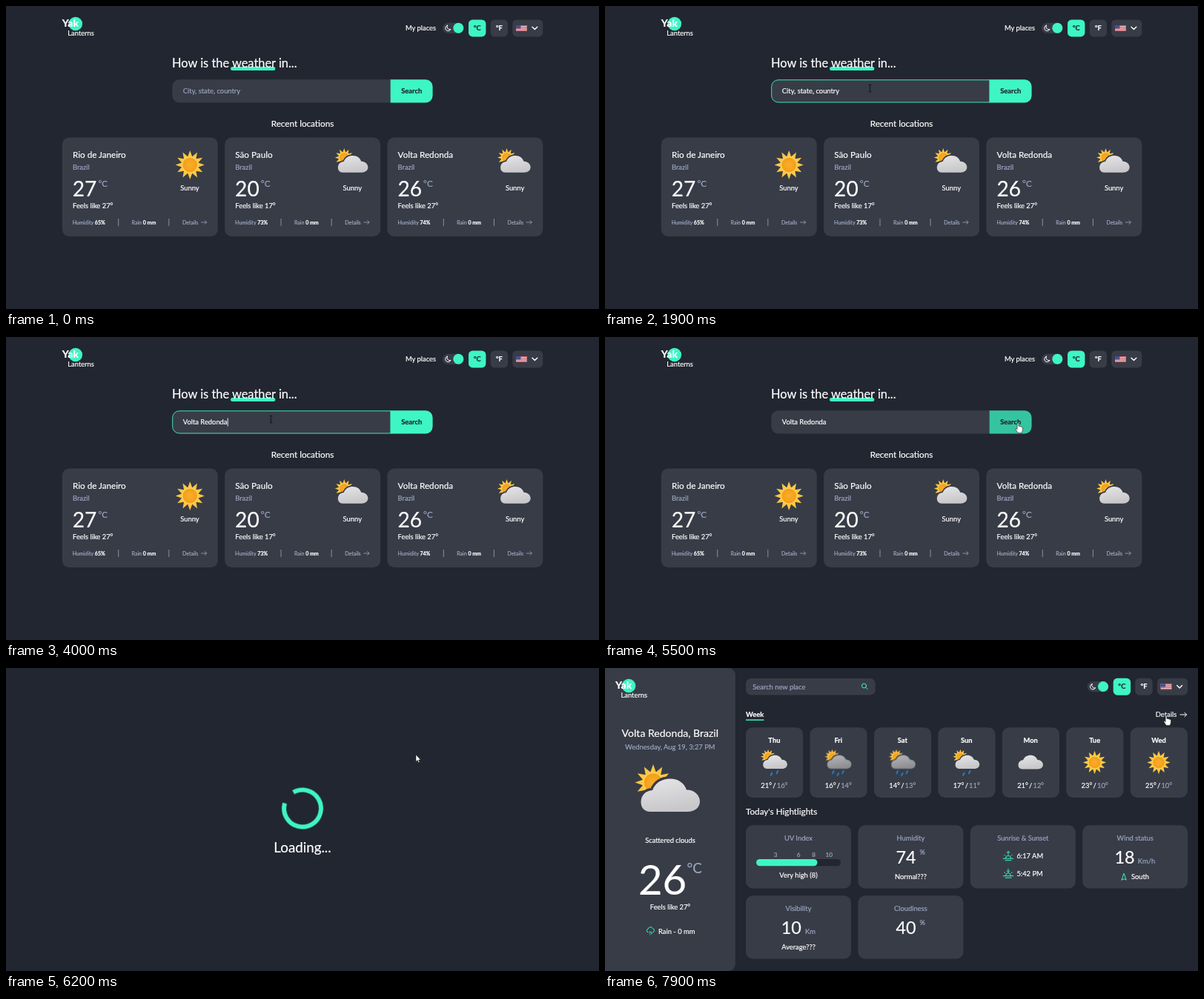
An HTML page for the animation above (8 s loop, 800 by 409 pixels).

```html
<!DOCTYPE html>
<html lang="en">
<head>
<meta charset="utf-8">
<title>Weather search</title>
<style>
:root { --bg: #222630; --card: #383c47; --mint: #3ef5c4; --muted: #9aa5be; }
html, body { margin: 0; width: 100%; height: 100%; overflow: hidden; background: var(--bg); }
svg { display: block; width: 100%; height: 100%; color: #fff; font-family: Lato, "Open Sans", sans-serif; }
text { font-size: 9.37px; }
text, tspan { fill: currentColor; stroke: currentColor; stroke-width: .2px; }
.b { font-weight: 700; }
.w { color: #fff; }
.g { color: var(--muted); }
.d { color: var(--bg); fill: var(--bg); }
.c { text-anchor: middle; }
.tight { word-spacing: -1.2px; }
.card { fill: var(--card); }
.mint { fill: var(--mint); }
.line { fill: none; stroke: var(--mint); stroke-width: 1; stroke-linecap: round; stroke-linejoin: round; }
.pen { fill: none; stroke: #fff; stroke-width: 1; stroke-linecap: round; stroke-linejoin: round; }

/* one 8 s loop; hard changes use step-end */
#home, #load, #dash, .arrow, .beam, .hand, .late { animation: 8s step-end infinite; }
#home { animation-name: home; }
#load { animation-name: load; }
#dash { animation-name: dash; }
.arrow { animation-name: arrow; }
.beam { animation-name: beam; }
.hand { animation-name: hand; }
.late { animation-name: late; }
.drop { animation: drop 8s step-end infinite; }
.slow { animation-delay: .1s; }
#cursor { animation: move 8s ease-in-out infinite; }
#ring { transform-origin: 400px 189.5px; animation: spin 1s linear infinite; }
#focus { animation: focus 8s linear infinite; }
#query { animation: query 8s linear infinite; }
#button { animation: button 8s linear infinite; }
#more text { animation: moreText 8s linear infinite; }
#more path { animation: moreLine 8s linear infinite; }

@keyframes home { 0% { opacity: 1 } 70.625%, 100% { opacity: 0 } }
@keyframes load { 0% { opacity: 0 } 70.625% { opacity: 1 } 78.125%, 100% { opacity: 0 } }
@keyframes dash { 0% { opacity: 0 } 78.125%, 100% { opacity: 1 } }
@keyframes arrow { 0% { opacity: 0 } 6.25% { opacity: 1 } 11.875% { opacity: 0 } 70.625% { opacity: 1 } 91.875%, 100% { opacity: 0 } }
@keyframes beam { 0% { opacity: 0 } 11.875% { opacity: 1 } 61.25%, 100% { opacity: 0 } }
@keyframes hand { 0% { opacity: 0 } 61.25% { opacity: 1 } 70.625% { opacity: 0 } 91.875%, 100% { opacity: 1 } }
@keyframes late { 0% { opacity: 0 } 80.625%, 100% { opacity: 1 } }
@keyframes drop { 0% { transform: translateY(-37.3px) } 80.625%, 100% { transform: none } }
@keyframes move {
  0%, 6.25% { transform: translate(420px, 200px) }
  15%, 57.5% { transform: translate(357.5px, 111px) }
  63% { transform: translate(571px, 121px) }
  66%, 69.5% { transform: translate(557px, 116px) }
  71%, 83% { transform: translate(553px, 117px) }
  94%, 100% { transform: translate(757px, 64px) }
}
@keyframes spin { from { transform: rotate(168deg) } to { transform: rotate(528deg) } }
@keyframes focus { 0%, 16.25% { opacity: 0 } 18%, 66.5% { opacity: 1 } 67.8%, 100% { opacity: 0 } }
@keyframes query { 0%, 16.25% { color: #9aa5be } 18%, 100% { color: #fff } }
@keyframes button { 0%, 61.25% { fill: #3ef5c4 } 63.75%, 100% { fill: #34c5a0 } }
@keyframes moreText { 0%, 91.875% { color: #9aa5be } 94%, 100% { color: #fff } }
@keyframes moreLine { 0%, 91.875% { stroke: #9aa5be } 94%, 100% { stroke: #fff } }
</style>
</head>
<body>
<svg id="stage" viewBox="0 0 800 409"></svg>
<script>
const text = (x, y, s, cls = '', size) =>
  `<text x="${x}" y="${y}" class="${cls}"${size ? ` style="font-size:${size}px"` : ''}>${s}</text>`;
const box = (x, y, w, h, r = 9.4, cls = 'card') =>
  `<rect x="${x}" y="${y}" width="${w}" height="${h}" rx="${r}" class="${cls}"/>`;
const path = (d, cls = 'line', extra = '') => `<path d="${d}" class="${cls}" ${extra}/>`;
const icon = (id, x, y, k) => `<use href="#${id}" transform="translate(${x} ${y}) scale(${k})"/>`;
const times = (n, f) => Array.from({ length: n }, (_, i) => f(i)).join('');

const rays = times(24, i => {
  const a = i * Math.PI / 12, r = i % 2 ? 14.5 : 24.5;
  return `${(r * Math.sin(a)).toFixed(2)},${(-r * Math.cos(a)).toFixed(2)} `;
});
const cloudPath = 'M20 64.5C12 64.5 7.5 59 7.5 51.5C7.5 42 14 36 23 35.5C27 25 36 20 47 20C58 20 66 26 69 35C79 34.5 87 42 87 50.5C87 59 80 64.5 70 64.5Z';
const drops = xs => xs.map(([x, y]) =>
  `<path d="M${x + 2} ${y - 4}L${x - 2} ${y + 4}" stroke="#2187d0" stroke-width="4.4" stroke-linecap="round"/>`).join('');

const defs = `<defs>
  <radialGradient id="core"><stop offset="0" stop-color="#f8ae2c"/><stop offset="1" stop-color="#f59e17"/></radialGradient>
  <linearGradient id="pale" x2=".3" y2="1"><stop offset="0" stop-color="#e6e6e8"/><stop offset="1" stop-color="#c8c8cb"/></linearGradient>
  <linearGradient id="dark" x2=".3" y2="1"><stop offset="0" stop-color="#b8b8ba"/><stop offset="1" stop-color="#8f8f93"/></linearGradient>
  <g id="sun"><polygon points="${rays}" fill="#fdc743"/><circle r="14" fill="#fbd05c"/><circle r="12.3" fill="url(#core)"/></g>
  <path id="shape" d="${cloudPath}"/>
  <use id="cloud" href="#shape" fill="url(#pale)"/>
  <g id="peek"><use href="#sun" x="24" y="25"/><use href="#shape" fill="#383c47" stroke="#383c47" stroke-width="6.5"/></g>
  <g id="mixed"><use href="#peek"/><use href="#cloud"/></g>
  <g id="shower"><use href="#mixed"/>${drops([[35, 82], [54, 76]])}</g>
  <g id="rain"><use href="#peek"/><use href="#shape" fill="url(#dark)"/>${drops([[27, 76], [43, 83], [59, 76]])}</g>
</defs>`;

const logo = x => `<circle cx="${x + 18}" cy="24" r="9.3" class="mint"/>`
  + text(x, 28, 'Yak', 'b', 14.06) + text(x + 7.5, 40, 'Lanterns');

const tools = (dx, dy) => `<g transform="translate(${dx} ${dy})">
  ${box(589, 22.8, 29, 14.2, 7.1)}<circle cx="610.3" cy="29.8" r="7" class="mint"/>
  ${path('M595.4 26.2A3.8 3.8 0 1 0 600 31.4A3.7 3.7 0 0 1 595.4 26.2Z', 'pen')}
  ${box(624, 18.4, 23.4, 23, 5.5, 'mint')}${text(635.7, 33.2, '°C', 'b c d')}
  ${box(653.6, 18.4, 23.4, 23, 5.5)}${text(665.3, 33.2, '°F', 'b c')}
  ${box(683.3, 18.4, 41, 23, 5.5)}
  <rect x="688" y="26" width="14.6" height="7.8" fill="#f1e4e6"/>
  ${times(4, i => `<rect x="688" y="${26 + i * 2.2}" width="14.6" height="1.2" fill="#c9505d"/>`)}
  <rect x="688" y="26" width="6.4" height="4.4" fill="#46508d"/>
  ${path('M710 28.2l3.4 3.4 3.4-3.4', 'pen', 'style="stroke-width:1.4"')}
</g>`;

const place = (i, city, temp, feels, humidity) => `<g transform="translate(${i * 219.3} 0)">
  ${box(75.8, 177.5, 210, 133.6)}
  ${text(90, 205.2, city, '', 11.7)}${text(90, 221.2, 'Brazil', 'g')}
  ${text(89.8, 257, temp, '', 28.1)}${text(124.5, 244, '°C', 'g', 11.7)}
  ${text(90, 273.2, `Feels like ${feels}°`)}
  ${i ? icon('mixed', 444 - 219.3, 191.8, .51) : icon('sun', 248.2, 214.5, .8)}
  ${text(248, 249, 'Sunny', 'c')}
  ${text(89.8, 294.6, `Humidity <tspan class="b w">${humidity}%</tspan>`, 'g', 7.03)}
  ${text(169.6, 294.6, 'Rain <tspan class="b w">0 mm</tspan>', 'g', 7.03)}
  ${text(238, 294.6, 'Details', 'g', 7.03)}
  ${path('M151.7 287v10M219.8 287v10', '', 'stroke="#9aa5be" stroke-width=".8"')}
  ${path('M263.5 292h7.2m-2.4-2.4l2.4 2.4-2.4 2.4', 'line', 'style="stroke:#9aa5be;stroke-width:.8"')}
</g>`;

const home = `<g id="home">
  ${logo(75.8)}${tools(0, 0)}${text(539, 33.2, 'My places')}
  ${box(303, 82, 60.3, 5, 2.5, 'mint')}${text(224, 83, 'How is the weather in...', '', 16.4)}
  ${box(224.3, 99.3, 330, 31.2)}
  <path id="focus" d="M519 99.8H233.7a9 9 0 0 0-9 9v12.2a9 9 0 0 0 9 9H519Z" fill="none" stroke="#3ef5c4" stroke-width=".9"/>
  <path id="button" d="M518.7 99.3h47.5a9.4 9.4 0 0 1 9.4 9.4v12.4a9.4 9.4 0 0 1-9.4 9.4h-47.5Z"/>
  ${text(547.2, 118.4, 'Search', 'b c d')}
  <text id="query" x="238.8" y="118.4"></text><rect id="caret" y="109.5" width=".9" height="11" fill="#fff"/>
  ${text(400, 163, 'Recent locations', 'c', 11.7)}
  ${place(0, 'Rio de Janeiro', 27, 27, 65)}${place(1, 'São Paulo', 20, 17, 73)}${place(2, 'Volta Redonda', 26, 27, 74)}
</g>`;

const load = `<g id="load">
  <circle id="ring" cx="400" cy="189.5" r="25" fill="none" stroke="#3ef5c4" stroke-width="6" pathLength="360" stroke-dasharray="316 44"/>
  ${text(400, 249, 'Loading...', 'c', 18.74)}
</g>`;

const week = [
  ['Thu', 21, 16, 'shower'], ['Fri', 16, 14, 'rain', 'late'], ['Sat', 14, 13, 'rain', 'late slow'],
  ['Sun', 17, 11, 'shower'], ['Mon', 21, 12, 'cloud'], ['Tue', 23, 10, 'sun'], ['Wed', 25, 10, 'sun']
];
const day = ([name, high, low, id, late = ''], i) => {
  const art = id === 'sun' ? icon(id, 38.3, 127.5, .64)
    : id === 'cloud' ? icon(id, 18.6, 109.4, .42) : icon(id, 20.2, 109.5, .41);
  return `<g transform="translate(${190 + i * 86.45} 0)">
    ${box(0, 80.2, 77.2, 94.8)}${text(38.4, 100.6, name, 'b c')}<g class="${late}">${art}</g>
    <g class="${late.replace('late', 'drop')}">${text(38.4, 162, `${high}° / <tspan class="g">${low}°</tspan>`, 'c tight')}</g></g>`;
};

const tile = (col, row, title, body) => `<g transform="translate(${190 + col * 151.4} ${212.2 + row * 95})">
  ${box(0, 0, 142, 85.4)}${text(71, 20.8, title, 'c g')}${body}</g>`;
const big = (x, n) => text(x, 51.8, n, '', 23.4);
const horizon = (y, tip, turn) => path(`M44.4 ${y + 3.5}h13.5M47.2 ${y + 6}h8M47.7 ${y + 3}a3.5 3.5 0 0 1 7 0`
  + `M45.9 ${y - 1.5}l1 1M56.4 ${y - 1.5}l-1 1M51.2 ${y - 6}v4.2M49.4 ${y + tip}l1.8 ${turn} 1.8 ${-turn}`);

const dash = `<g id="dash">
  ${path('M0 0H166.5a9.4 9.4 0 0 1 9.4 9.4V399.6a9.4 9.4 0 0 1-9.4 9.4H0Z', 'card')}
  ${logo(14)}
  ${text(87.8, 93.4, 'Volta Redonda, Brazil', 'c', 14.06)}${text(87.8, 110.3, 'Wednesday, Aug 19, 3:27 PM', 'c g')}
  ${icon('mixed', 41, 129.6, 1)}
  ${text(88, 236.2, 'Scattered clouds', 'c')}
  ${text(45, 306, '26', '', 56.2)}${text(110.5, 276.5, '°C', 'g', 18.74)}
  ${text(88, 326.3, 'Feels like 27°', 'c')}
  ${path('M58.3 357a2.6 2.6 0 0 1 0-5a3.2 3.2 0 0 1 6-.4a2.8 2.8 0 0 1 .2 5.4M60.8 355.5v2.3M62.8 356.5v2.5M60.8 359.6v.3')}
  ${text(72, 359.3, 'Rain - 0 mm')}

  ${box(190, 14, 174.8, 22.4, 7)}${text(199.3, 28.6, 'Search new place', 'g')}
  <circle cx="349.5" cy="24" r="3" class="line"/>${path('M351.8 26.3l2.3 2.3')}
  ${tools(61.7, -4.7)}
  ${text(190, 66.2, 'Week', 'b')}${box(190, 69.4, 24.4, 1.5, 0, 'mint')}
  <g id="more">${text(742.8, 66.4, 'Details')}${path('M776 63h8.6m-2.8-2.8l2.8 2.8-2.8 2.8')}</g>
  ${week.map(day).join('')}
  ${text(190, 198.2, "Today's Hightlights", '', 11.7)}
  ${tile(0, 0, 'UV Index', [[3, 40], [6, 71.2], [8, 91.5], [10, 112.3]].map(([n, x]) => text(x, 42.6, n, 'c g', 8.2)).join('')
    + box(14, 45.7, 114, 9.4, 4.7, 'd') + box(14, 45.7, 82.5, 9.4, 4.7, 'mint') + text(71, 71, 'Very high (8)', 'c'))}
  ${tile(1, 0, 'Humidity', big(51, 74) + text(83, 40, '%', 'g') + text(71, 72.4, 'Normal???', 'c'))}
  ${tile(2, 0, 'Sunrise &amp; Sunset', horizon(41.5, -4.4, -1.8) + text(62.6, 45, '6:17 AM')
    + horizon(65, -3.4, 1.8) + text(62.6, 68.6, '5:42 PM'))}
  ${tile(3, 0, 'Wind status', big(43.3, 18) + text(74.6, 51.8, 'Km/h', 'g')
    + path('M56 65.5l3 8.4-3-1.5-3 1.5Z') + text(65.7, 72.8, 'South'))}
  ${tile(0, 1, 'Visibility', big(47.8, 10) + text(80, 51.8, 'Km', 'g') + text(71, 72.4, 'Average???', 'c'))}
  ${tile(1, 1, 'Cloudiness', big(51, 40) + text(83, 40, '%', 'g'))}
</g>`;

const cursor = `<g id="cursor">
  <path class="arrow" d="M0 0V9.4L2.1 7.5 3.6 10.8 5 10.2 3.6 7H6.4Z" fill="#fff" stroke="#15171c" stroke-width=".5"/>
  <path class="beam" d="M-1.8-4.8H-.5L0-4.2.5-4.8H1.8M0-4.2V4.2M-1.8 4.8H-.5L0 4.2.5 4.8H1.8" fill="none" stroke="#0b0c10" stroke-width=".9"/>
  <path class="hand" d="M-.9.9C-.9-.4 1-.4 1 .9V4.6C1.8 4 2.8 4.2 3 5C3.8 4.5 4.7 4.8 4.9 5.6C5.8 5.3 6.5 5.8 6.5 6.8V9.6L5.3 13.4H.1L-2.8 9C-3.6 7.7-2.3 6.9-1.5 7.8L-.9 8.6Z" fill="#fff" stroke="#15171c" stroke-width=".6"/>
</g>`;

document.getElementById('stage').innerHTML = defs + home + load + dash + cursor;

const query = document.getElementById('query'), caret = document.getElementById('caret');
const typed = 'Volta Redonda', focusAt = 1300, blurAt = 5350, typeAt = 2200, keyMs = 112;

function tick(now) {
  const t = now % 8000;
  const n = Math.max(0, Math.min(typed.length, Math.floor((t - typeAt) / keyMs) + 1));
  const s = n ? typed.slice(0, n) : 'City, state, country';
  if (query.textContent !== s) query.textContent = s;
  const lastKey = n ? typeAt + (n - 1) * keyMs : focusAt;
  const on = t >= focusAt && t < blurAt && (t - lastKey) % 1000 < 500;
  caret.setAttribute('x', 239 + (n ? query.getComputedTextLength() : 0));
  caret.setAttribute('opacity', on ? 1 : 0);
}
const start = performance.now();
tick(0);
requestAnimationFrame(function loop() {
  tick(performance.now() - start);
  requestAnimationFrame(loop);
});
</script>
</body>
</html>
```
